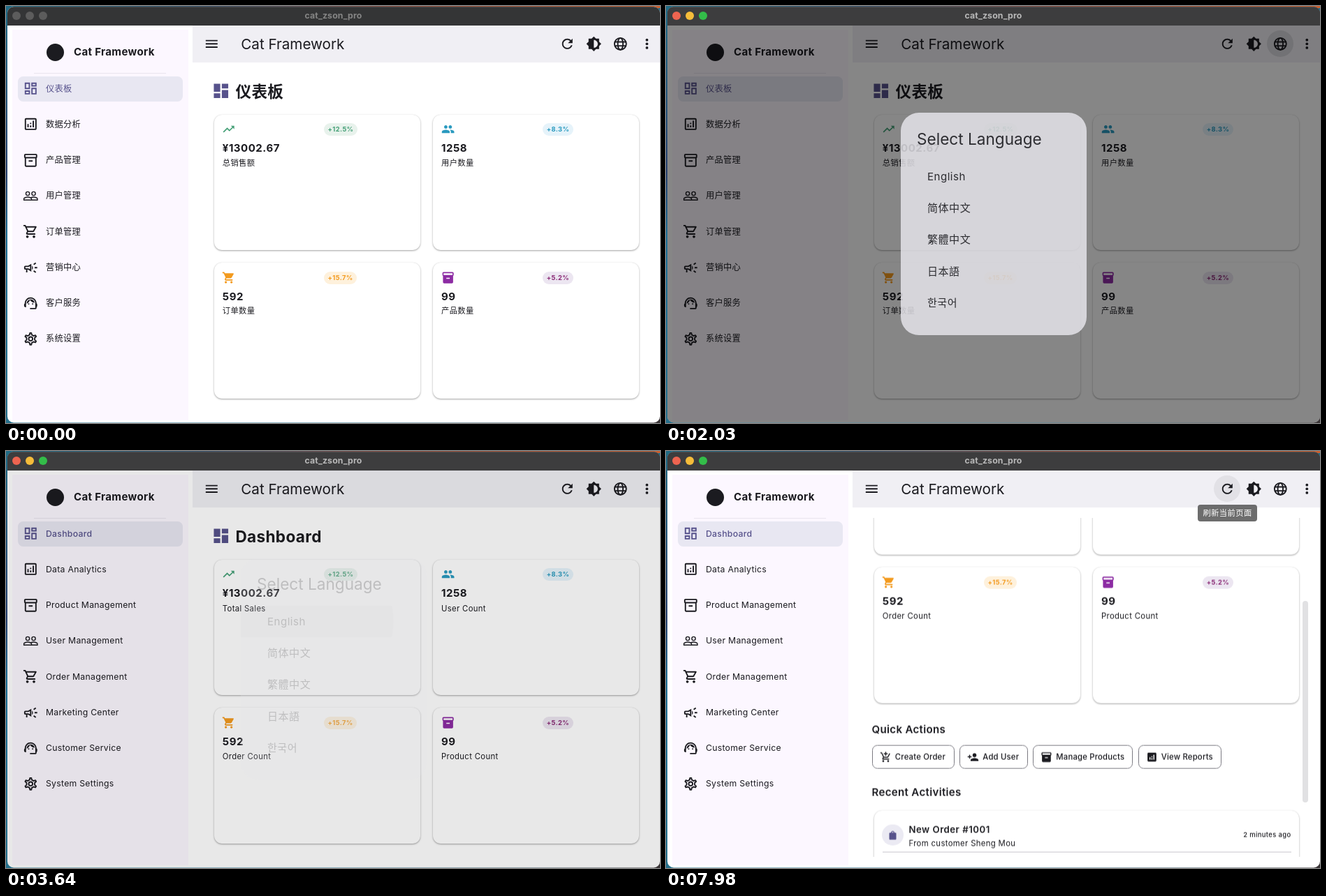
Animation, 936 px wide and 598 px high, one loop 8000 ms. Source, as an HTML page:

```html
<!DOCTYPE html>
<html lang="zh-CN">
<head>
<meta charset="utf-8">
<title>Dashboard</title>
<style>
html, body { margin: 0; width: 100%; height: 100%; overflow: hidden; }
body {
  background:
    linear-gradient(90deg, #1f6c86, #35506b 30%, #8a4a3c 60%, #c9602f) 0 0 / 100% 3px no-repeat,
    linear-gradient(90deg, transparent 50%, #3a3436) 0 100% / 100% 12px no-repeat,
    linear-gradient(#1f6c86, #27406e 40%, #1d6f96 55%, #24708c);
  font-family: Inter, "Noto Sans CJK SC", "Noto Sans CJK", sans-serif;
  color: #1b1b20;
}
div, svg { position: absolute; }
#win { left: 0; top: 0; width: 936px; height: 598px; background: #fff; overflow: hidden;
  clip-path: inset(1px 0 .5px 2px round 9px); }
.layer { left: 0; top: 0; width: 936px; height: 598px; }
.t { line-height: 20px; margin-top: -10px; white-space: nowrap; }
.card { box-sizing: border-box; background: #fff; border-radius: 11.3px;
  box-shadow: 0 1px 2.5px rgba(0,0,0,.36), 0 0 1px rgba(0,0,0,.12); }
.pill { height: 18px; line-height: 18px; padding: 0 5.5px; border-radius: 9px;
  font-size: 9.4px; font-weight: 700; letter-spacing: .38px; }
.btn { box-sizing: border-box; height: 34px; border: 1px solid #7b7a82; border-radius: 7.5px; }
.bar { left: 0; top: 0; width: 936px; height: 28px; }
.light { width: 12px; height: 12px; top: 8px; border-radius: 50%; }
.hover { width: 38px; height: 38px; top: 35px; border-radius: 50%; background: rgba(20,28,20,.06); }
.globe { background: rgba(20,28,20,.1); }
#view { left: 267px; top: 96px; width: 669px; height: 486px; overflow: hidden; }
#page { left: -267px; top: -96px; width: 936px; height: 900px; }
#thumb { left: 911px; top: 96px; width: 8px; height: 289px; border-radius: 4px; background: #e1e1e3; }
#barrier { left: 0; top: 28px; width: 936px; height: 570px; background: rgba(0,0,0,.54); }
#panel { left: 336px; top: 153px; width: 266px; height: 319px; border-radius: 26px; background: #e7e6ec; }
#row { left: 336px; top: 222px; width: 266px; height: 44.5px; overflow: hidden; }
#ripple { left: 26px; top: -60px; width: 164px; height: 164px; border-radius: 50%; background: rgba(20,30,25,.07); }
#tip { left: 761px; top: 77px; width: 85px; height: 24px; border-radius: 4px; background: rgba(97,97,97,.92);
  color: #fff; font-size: 11.3px; line-height: 24px; text-align: center; letter-spacing: .4px; white-space: nowrap; }

.zh, .en, .focus, .globe, .reload, #page, #thumb, #barrier, #dialog, #ripple, #tip {
  animation: 8s step-end infinite; }
.zh { animation-name: zh; }
.en { animation-name: en; }
.focus { animation-name: focus; }
.globe { animation-name: globe; }
.reload { animation-name: reload; }
#page { animation-name: scroll; }
#thumb { animation-name: thumb; }
#barrier { animation-name: barrier; }
#dialog { animation-name: dialog; }
#ripple { animation-name: ripple; }
#tip { animation-name: tip; }
@keyframes zh { 0% { opacity: 1 } 44.625%, 100% { opacity: 0 } }
@keyframes en { 0% { opacity: 0 } 44.625%, 100% { opacity: 1 } }
@keyframes focus { 0% { opacity: 0 } 23.625%, 100% { opacity: 1 } }
@keyframes globe { 0% { opacity: 0 } 23.625% { opacity: 1 } 27.125% { opacity: .7 } 28% { opacity: .35 } 28.875%, 100% { opacity: 0 } }
@keyframes reload { 0% { opacity: 0 } 89.25%, 100% { opacity: 1 } }
@keyframes tip { 0% { opacity: 0 } 98.875% { opacity: .6 } 99.75%, 100% { opacity: 1 } }
@keyframes barrier {
  0% { opacity: 0 } 24.5% { opacity: .25 } 25.375% { opacity: .88 } 26.25% { opacity: 1 }
  44.625% { opacity: .91 } 45.5% { opacity: .17 } 46.375%, 100% { opacity: 0 }
}
@keyframes dialog {
  0% { opacity: 0 } 24.5% { opacity: .28 } 25.375% { opacity: .83 } 26.25% { opacity: 1 }
  44.625% { opacity: .82 } 45.5% { opacity: .2 } 46.375%, 100% { opacity: 0 }
}
@keyframes ripple {
  0% { transform: scale(0) } 42.875% { transform: scale(.3) } 43.75% { transform: scale(.65) }
  44.625% { transform: scale(1) } 45.5% { transform: scale(1.35) } 46.375%, 100% { transform: scale(0) }
}
@keyframes scroll {
  0% { transform: none } 85.75% { transform: translateY(-15px) } 86.625% { transform: translateY(-72px) }
  87.5% { transform: translateY(-138px) } 88.375% { transform: translateY(-184px) }
  89.25%, 100% { transform: translateY(-201.4px) }
}
@keyframes thumb {
  0% { opacity: 0; transform: none } 86.625% { opacity: .5; transform: translateY(43px) }
  87.5% { opacity: 1; transform: translateY(82px) } 88.375% { opacity: 1; transform: translateY(109px) }
  89.25%, 100% { opacity: 1; transform: translateY(119px) }
}
</style>
</head>
<body>
<div id="win">
  <div id="side" class="layer"></div>
  <div id="view"><div id="page"></div></div>
  <div id="thumb"></div>
  <div id="head" class="layer"></div>
  <div id="tip">刷新当前页面</div>
  <div id="barrier"></div>
  <div id="dialog" class="layer">
    <div id="panel"></div>
    <div id="row"><div id="ripple"></div></div>
  </div>
  <div id="frame" class="bar"></div>
</div>
<script>
const path = d => `<path d="${d}"/>`;
const line = inner => `<g fill="none" stroke="currentColor" stroke-width="2">${inner}</g>`;
const wheels = 'M7 18c-1.1 0-1.99.9-1.99 2S5.9 22 7 22s2-.9 2-2-.9-2-2-2zm10 0c-1.1 0-1.99.9-1.99 2s.89 2 1.99 2 2-.9 2-2-.9-2-2-2z';
const square = 'M19 3H5c-1.1 0-2 .9-2 2v14c0 1.1.9 2 2 2h14c1.1 0 2-.9 2-2V5c0-1.1-.9-2-2-2z';
const box = 'M20 2H4c-1 0-2 .9-2 2v3.01c0 .72.43 1.34 1 1.69V20c0 1.1 1.1 2 2 2h14c.9 0 2-.9 2-2V8.7c.57-.35 1-.97 1-1.69V4c0-1.1-1-2-2-2z';
const icons = {
  dashboard: path('M3 13h8V3H3v10zm0 8h8v-6H3v6zm10 0h8V11h-8v10zm0-18v6h8V3h-8z'),
  tiles: line('<path d="M4 4h6v8H4zM14 4h6v4h-6zM14 12h6v8h-6zM4 16h6v4H4z"/>'),
  chart: path(square + 'm0 16H5V5h14v14zM7 12h2v5H7zM15 7h2v10h-2zM11 14h2v3h-2zM11 10h2v2h-2z'),
  chartFull: path(square + 'M9 17H7v-5h2v5zm4 0h-2v-3h2v3zm0-5h-2v-2h2v2zm4 5h-2V7h2v10z'),
  box: path(box + 'm-1 18H5V9h14v11zm1-13H4V4h16v3zM9 12h6v2H9z'),
  boxFull: path(box + 'm-5 12H9v-2h6v2zm5-7H4V4h16v3z'),
  people: path('M16.5 13c-1.2 0-3.07.34-4.5 1-1.43-.67-3.3-1-4.5-1C5.33 13 1 14.08 1 16.25V19h22v-2.75c0-2.17-4.33-3.25-6.5-3.25zm-4 4.5h-10v-1.25c0-.54 2.56-1.75 5-1.75s5 1.21 5 1.75v1.25zm9 0H14v-1.25c0-.46-.2-.86-.52-1.22.88-.3 1.96-.53 3.02-.53 2.44 0 5 1.21 5 1.75v1.25z')
    + '<g fill="none" stroke="currentColor" stroke-width="1.5"><circle cx="7.5" cy="8.5" r="2.75"/><circle cx="16.5" cy="8.5" r="2.75"/></g>',
  peopleFull: path('M16 11c1.66 0 2.99-1.34 2.99-3S17.66 5 16 5s-3 1.34-3 3 1.34 3 3 3zm-8 0c1.66 0 2.99-1.34 2.99-3S9.66 5 8 5 5 6.34 5 8s1.34 3 3 3zm0 2c-2.33 0-7 1.17-7 3.5V19h14v-2.5c0-2.33-4.67-3.5-7-3.5zm8 0c-.29 0-.62.02-.97.05 1.16.84 1.97 1.97 1.97 3.45V19h6v-2.5c0-2.33-4.67-3.5-7-3.5z'),
  cart: path('M15.55 13c.75 0 1.41-.41 1.75-1.03l3.58-6.49c.37-.66-.11-1.48-.87-1.48H5.21l-.94-2H1v2h2l3.6 7.59-1.35 2.44C4.52 15.37 5.48 17 7 17h12v-2H7l1.1-2h7.45zM6.16 6h12.15l-2.76 5H8.53L6.16 6z' + wheels),
  cartFull: path('M1 2v2h2l3.6 7.59-1.35 2.45c-.16.28-.25.61-.25.96 0 1.1.9 2 2 2h12v-2H7.42c-.14 0-.25-.11-.25-.25l.03-.12.9-1.63h7.45c.75 0 1.41-.41 1.75-1.03l3.58-6.49c.08-.14.12-.31.12-.48 0-.55-.45-1-1-1H5.21l-.94-2H1z' + wheels),
  cartAdd: path('M11 9h2V6h3V4h-3V1h-2v3H8v2h3v3zM7.17 14.75l.03-.12.9-1.63h7.45c.75 0 1.41-.41 1.75-1.03l3.86-7.01L19.42 4l-3.87 7H8.53L4.27 2H1v2h2l3.6 7.59-1.35 2.45C4.5 15.4 5.5 17 7 17h12v-2H7.42c-.13 0-.25-.11-.25-.25z' + wheels),
  horn: path('M18 11v2h4v-2h-4zM16 17.61l3.2 2.39 1.2-1.6-3.2-2.4zM20.4 5.6L19.2 4 16 6.4 17.2 8zM4 9c-1.1 0-2 .9-2 2v2c0 1.1.9 2 2 2h1v4h2v-4h1l5 3V6L8 9H4zm5.03 1.71L11 9.53v4.94l-1.97-1.18-.48-.29H4v-2h4.55l.48-.29zM15.5 12c0-1.33-.58-2.53-1.5-3.35v6.69c.92-.81 1.5-2.01 1.5-3.34z'),
  agent: path('M21 12.22C21 6.73 16.74 3 12 3c-4.69 0-9 3.65-9 9.28-.6.34-1 .98-1 1.72v2c0 1.1.9 2 2 2h1v-6.1c0-3.87 3.13-7 7-7s7 3.13 7 7V19h-8v2h8c1.1 0 2-.9 2-2v-1.22c.59-.31 1-.92 1-1.64v-2.3c0-.7-.41-1.31-1-1.62zM18 11.03C17.52 8.18 15.04 6 12.05 6c-3.03 0-6.29 2.51-6.03 6.45 2.47-1.01 4.33-3.21 4.86-5.89 1.31 2.63 4 4.44 7.12 4.47z')
    + '<circle cx="9" cy="13" r="1"/><circle cx="15" cy="13" r="1"/>',
  gear: line('<path stroke-linejoin="round" d="M13.1 3l.5 2.8 2.97 1.71 2.67-.96 1.1 1.9-2.17 1.84v3.42l2.17 1.84-1.1 1.9-2.67-.96-2.97 1.71-.5 2.8h-2.2l-.5-2.8-2.97-1.71-2.67.96-1.1-1.9 2.17-1.84v-3.42L3.66 8.45l1.1-1.9 2.67.96L10.4 5.8l.5-2.8z"/><circle cx="12" cy="12" r="3"/>'),
  menu: path('M3 18h18v-2H3v2zm0-5h18v-2H3v2zm0-7v2h18V6H3z'),
  refresh: path('M17.65 6.35C16.2 4.9 14.21 4 12 4c-4.42 0-7.99 3.58-7.99 8s3.57 8 7.99 8c3.73 0 6.84-2.55 7.73-6h-2.08c-.82 2.33-3.04 4-5.65 4-3.31 0-6-2.69-6-6s2.69-6 6-6c1.66 0 3.14.69 4.22 1.78L13 11h7V4l-2.35 2.35z'),
  contrast: path('M20 15.31L23.31 12 20 8.69V4h-4.69L12 .69 8.69 4H4v4.69L.69 12 4 15.31V20h4.69L12 23.31 15.31 20H20v-4.69zM12 18V6c3.31 0 6 2.69 6 6s-2.69 6-6 6z'),
  globe: line('<circle cx="12" cy="12" r="9"/><ellipse cx="12" cy="12" rx="4" ry="9"/><path d="M3.5 9h17M3.5 15h17"/>'),
  more: [6, 12, 18].map(y => `<circle cx="12" cy="${y}" r="2"/>`).join(''),
  trend: path('M16 6l2.29 2.29-4.88 4.88-4-4L2 16.59 3.41 18l6-6 4 4 6.3-6.29L22 12V6z'),
  userAdd: path('M15 12c2.21 0 4-1.79 4-4s-1.79-4-4-4-4 1.79-4 4 1.79 4 4 4zm-9-2V7H4v3H1v2h3v3h2v-3h3v-2H6zm9 4c-2.67 0-8 1.34-8 4v2h16v-2c0-2.66-5.33-4-8-4z'),
  bag: path('M18 6h-2c0-2.21-1.79-4-4-4S8 3.79 8 6H6c-1.1 0-2 .9-2 2v12c0 1.1.9 2 2 2h12c1.1 0 2-.9 2-2V8c0-1.1-.9-2-2-2zm-6-2c1.1 0 2 .9 2 2h-4c0-1.1.9-2 2-2z')
};

const ink = '#1b1b20', accent = '#57528c';
const add = (id, ...parts) => document.getElementById(id).insertAdjacentHTML('beforeend', parts.flat(9).join(''));
const rect = (x, y, w, h, css = '', cls = '') =>
  `<div class="${cls}" style="left:${x}px;top:${y}px;width:${w}px;height:${h}px;${css}"></div>`;
const dot = (x, y, r, color) => rect(x - r, y - r, 2 * r, 2 * r, `border-radius:50%;background:${color}`);
// Text is centred vertically on y.
const text = (x, y, str, size, { weight = 400, gap = 0, color = ink, cls = '', css = '' } = {}) =>
  `<div class="t ${cls}" style="left:${x}px;top:${y}px;font-size:${size}px;font-weight:${weight};letter-spacing:${gap}px;color:${color};${css}">${str}</div>`;
const both = (x, y, zh, en, size, opts, drop = 0) =>
  text(x, y, zh, size, { ...opts, cls: 'zh' }) + text(x, y + drop, en, size, { ...opts, cls: 'en' });
const icon = (name, cx, cy, size = 22.6, color = ink) =>
  `<svg viewBox="0 0 24 24" width="${size}" height="${size}" style="left:${cx - size / 2}px;top:${cy - size / 2}px;color:${color}" fill="currentColor">${icons[name]}</svg>`;

const nav = [
  ['tiles', '仪表板', 'Dashboard'], ['chart', '数据分析', 'Data Analytics'],
  ['box', '产品管理', 'Product Management'], ['people', '用户管理', 'User Management'],
  ['cart', '订单管理', 'Order Management'], ['horn', '营销中心', 'Marketing Center'],
  ['agent', '客户服务', 'Customer Service'], ['gear', '系统设置', 'System Settings']
];
add('side',
  rect(9, 34, 252, 560, 'background:#fcf7ff'),
  dot(70, 66, 12.5, ink),
  text(97, 66, 'Cat Framework', 15.06, { weight: 700, gap: .32 }),
  rect(40, 96, 189, 1, 'background:#e9e4ee'),
  rect(17, 100.5, 235.5, 36.5, 'border-radius:7.5px;background:#e8e7f2'),
  nav.map(([name, zh, en], i) => {
    const y = 118.5 + i * 51.27, color = i ? ink : accent;
    return icon(name, 35, y, 22.6, color) + both(57, y, zh, en, 12.24, { gap: .27, color, weight: i ? 400 : 500 });
  }));

const stats = [
  ['trend', '#45a077', '#e8f2ec', '+12.5%', '¥13002.67', '总销售额', 'Total Sales'],
  ['peopleFull', '#2a9abf', '#e6f3fa', '+8.3%', '1258', '用户数量', 'User Count'],
  ['cartFull', '#f39a1e', '#fef1dc', '+15.7%', '592', '订单数量', 'Order Count'],
  ['boxFull', '#8c2ba3', '#ece6f1', '+5.2%', '99', '产品数量', 'Product Count']
];
const buttons = [
  ['cartAdd', 294.5, 118, 'Create Order'], ['userAdd', 420, 97.5, 'Add User'],
  ['boxFull', 525, 143, 'Manage Products'], ['chartFull', 675.5, 119.5, 'View Reports']
];
add('page',
  icon('dashboard', 307.5, 122, 27.5, accent),
  both(328.5, 122.5, '仪表板', 'Dashboard', 22.6, { weight: 700, gap: .3 }),
  stats.map(([name, color, tint, delta, value, zh, en], i) => {
    const x = 297.5 + i % 2 * 313.2, y = 155.5 + (i >> 1) * 212.7;
    return rect(x, y, 295, 194.5, '', 'card')
      + icon(name, x + 21.5, y + 21.5, 19.3, color)
      + `<div class="pill" style="left:${x + 157.5}px;top:${y + 12.5}px;color:${i == 3 ? '#8a2a75' : color};background:${tint}">${delta}</div>`
      + text(x + 12.3, y + 48.7, value, 15.06, { weight: 700, gap: .5 })
      + both(x + 12.3, y + 69, zh, en, 11.3, { gap: .34 }, 1);
  }),
  text(294.5, 601, 'Quick Actions', 15.06, { weight: 600, gap: .34 }),
  buttons.map(([name, x, w, label]) =>
    `<div class="btn" style="left:${x}px;top:623px;width:${w}px"></div>`
    + icon(name, x + 19.8, 640, 16.9)
    + text(x + 33.3, 640.2, label, 11.3, { weight: 500, gap: .2 })),
  text(294.5, 691.3, 'Recent Activities', 15.06, { weight: 600, gap: .34 }),
  rect(297.5, 717.2, 608.5, 180, '', 'card'),
  dot(324.5, 752.2, 15.2, '#ebeaf3'),
  icon('bag', 324.5, 752.2, 15, accent),
  text(347.5, 744.3, 'New Order #1001', 13.2, { weight: 600, gap: .5 }),
  text(347.5, 764, 'From customer Sheng Mou', 11.3, { gap: .36 }),
  text(0, 752.4, '2 minutes ago', 9.4, { weight: 500, gap: .4, css: 'left:auto;right:41.4px' }),
  rect(309.5, 776, 585, 1.3, 'background:#c8c6ce'));

add('head',
  rect(267, 28, 669, 53, 'background:#f0eff4'),
  `<div class="hover globe" style="left:860px"></div><div class="hover reload" style="left:784px"></div>`,
  icon('menu', 294, 54),
  text(336.3, 54.5, 'Cat Framework', 20.7, { gap: -.04 }),
  icon('refresh', 803, 54), icon('contrast', 841, 54), icon('globe', 879, 54), icon('more', 917, 54));

add('dialog',
  text(359, 191, 'Select Language', 22.6),
  ['English', '简体中文', '繁體中文', '日本語', '한국어'].map((name, i) =>
    text(374, 244.5 + i * 45.4, name, 15.06, { gap: .5 })));

const titleBar = (cls, bg, color, lights) =>
  `<div class="bar ${cls}" style="background:${bg};box-shadow:inset 0 2px rgba(255,255,255,.1)">`
  + lights.map((c, i) => `<div class="light" style="left:${9 + i * 19}px;background:${c}"></div>`).join('')
  + text(368.5, 14, 'cat_zson_pro', 12.3, { weight: 700, gap: .15, color, css: 'width:200px;text-align:center' })
  + '</div>';
add('frame',
  titleBar('', '#343536', '#858585', Array(3).fill('#5c5c5c')),
  titleBar('focus', '#3d3d3e', '#b8b8b8', ['#ee6450', '#f5bc3a', '#33bd49']));
</script>
</body>
</html>
```
